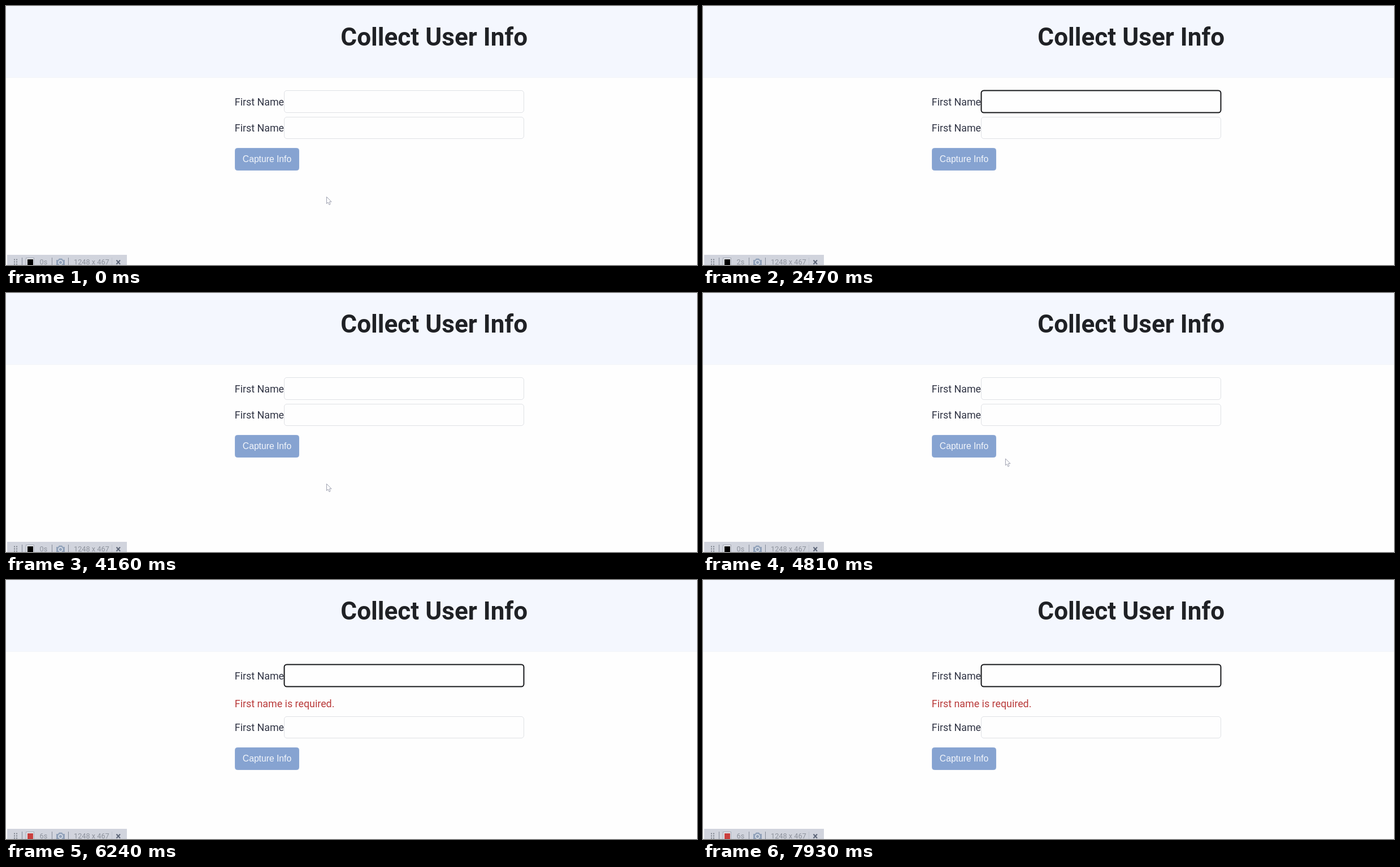
Animation, 1223 px wide and 458 px high, one loop 8000 ms. Source, as an HTML page:

```html
<!DOCTYPE html>
<html lang="en">
<head>
<meta charset="utf-8">
<title>Collect User Info</title>
<style>
  html, body { margin: 0; width: 100%; height: 100%; overflow: hidden; background: #fefefe; }
  svg { display: block; }
  text { font: 17.85px Roboto, sans-serif; fill: #303444; }
  .title { font-size: 44.1px; font-weight: 700; fill: #1f2125; }
  .field { fill: #fefefe; stroke: #dfe1e5; }
  .field.focus { stroke: #17181b; stroke-width: 2; }
  .button { font: 15.7px "Liberation Sans", Arial, sans-serif; fill: #f3f6fb; text-anchor: middle; }
  .error { fill: #b93a3a; }
  .bar text { font-size: 12.74px; fill: #8e939d; }
</style>
</head>
<body>
<svg width="1223" height="458" viewBox="0 0 1223 458">
  <rect width="1223" height="126" fill="#f4f7fe"/>
  <path d="M0 126.5H1223" stroke="#f3f4f8"/>
  <text class="title" x="592.3" y="70">Collect User Info</text>

  <text x="404.8" y="175.5">First Name</text>
  <rect id="first" class="field" x="492.5" y="149.5" width="424" height="39" rx="4.5"/>
  <text id="typed" x="501" y="175.5"></text>
  <text id="error" class="error" x="404.8" y="225"></text>

  <g id="rest">
    <text x="404.8" y="222">First Name</text>
    <rect class="field" x="492.5" y="196.5" width="424" height="38" rx="4.5"/>
    <rect x="405.5" y="251.5" width="113" height="39" rx="4" fill="#86a3d1" stroke="#91abd5"/>
    <text class="button" x="462" y="276">Capture Info</text>
  </g>

  <g class="bar">
    <rect x="2" y="440" width="212" height="18" fill="#d1d4dd"/>
    <path d="M14 448.5H20M14 452.5H20M14 456.5H20" stroke="#7d828c" stroke-width="2" stroke-dasharray="2"/>
    <path d="M28.5 445V458M81.5 445V458M110.5 445V458" stroke="#858b98"/>
    <path d="M187.5 445V458" stroke="#bfc4ce"/>
    <rect x="35.5" y="445.5" width="14" height="15" fill="#e5e7ec" stroke="#a4a9b4"/>
    <rect id="stop" x="38" y="448" width="10" height="10"/>
    <text id="timer" x="59.5" y="457"></text>
    <path d="M89 449H92L94 446.5H99L101 449H104V459H89Z" fill="#92a2ba"/>
    <circle cx="96.5" cy="453.5" r="3.5" fill="#92a2ba" stroke="#e3e8ef" stroke-width="1.5"/>
    <text x="120" y="457">1248 x 467</text>
    <path d="M195.5 449.5L202 456.5M202 449.5L195.5 456.5" stroke="#5d6678" stroke-width="2"/>
  </g>

  <path id="arrow" d="M.5 .5V12.5L3 10L5 14.5L7 13.5L5.3 9.2H9Z" fill="#fff" stroke="#9195a5" stroke-width=".9" stroke-linejoin="round"/>
  <g id="blocked" fill="#e9edf4" stroke="#34363d" stroke-width="2">
    <circle r="5.5"/><path d="M-4 -4L4 4"/>
  </g>
</svg>
<script>
const LOOP = 8000, STEP = 130, RESTART = 4160;
const FOCUS = 1820, REQUIRED = 1950, TYPE = 2730, LEAVE = 3120, BLUR = 3250;
const start = [567, 337], button = [444, 259], field = [560, 192], edge = [640, 214], away = [661, 300];
const $ = id => document.getElementById(id);

// Position between two points; bend > 1 makes x lag behind y.
function glide(t, begin, end, from, to, bend = 1) {
  const k = Math.min(1, Math.max(0, (t - begin) / (end - begin)));
  return [from[0] + (to[0] - from[0]) * k ** bend, from[1] + (to[1] - from[1]) * k];
}

// The pointer is out of sight while it rests in the text field.
function pointerAt(t, retake) {
  if (t <= 1040) return glide(t, STEP, 1040, start, button, 2.4);
  if (t < FOCUS) return glide(t, 1170, FOCUS, button, field);
  if (t >= LEAVE && !retake) return glide(t, LEAVE, 3510, edge, away);
  return null;
}

function place(el, p, visible) {
  el.style.display = visible ? "" : "none";
  if (visible) el.setAttribute("transform", `translate(${p})`);
}

function draw(now) {
  const time = Math.floor(now % LOOP / STEP) * STEP;
  const retake = time >= RESTART;
  const t = time % RESTART;

  const focus = t >= FOCUS && (retake || t < BLUR);
  const error = retake ? t >= REQUIRED && "First name is required."
    : t >= BLUR && "First name must be at least 5 characters long.";
  const seconds = retake && error ? 6 : Math.floor(t / 1000);

  $("first").classList.toggle("focus", focus);
  $("typed").textContent = !retake && t >= TYPE ? "a" : "";
  $("error").textContent = error || "";
  $("rest").setAttribute("transform", `translate(0 ${error ? 45 : 0})`);
  $("timer").textContent = seconds + "s";
  $("stop").setAttribute("fill", seconds > 2 ? "#c9403f" : "#000");

  const p = pointerAt(t, retake);
  const onButton = p && !error && p[0] > 405 && p[0] < 519 && p[1] > 251 && p[1] < 291;
  place($("arrow"), p, p && !onButton);
  place($("blocked"), p, onButton);
  requestAnimationFrame(draw);
}
requestAnimationFrame(draw);
</script>
</body>
</html>
```
